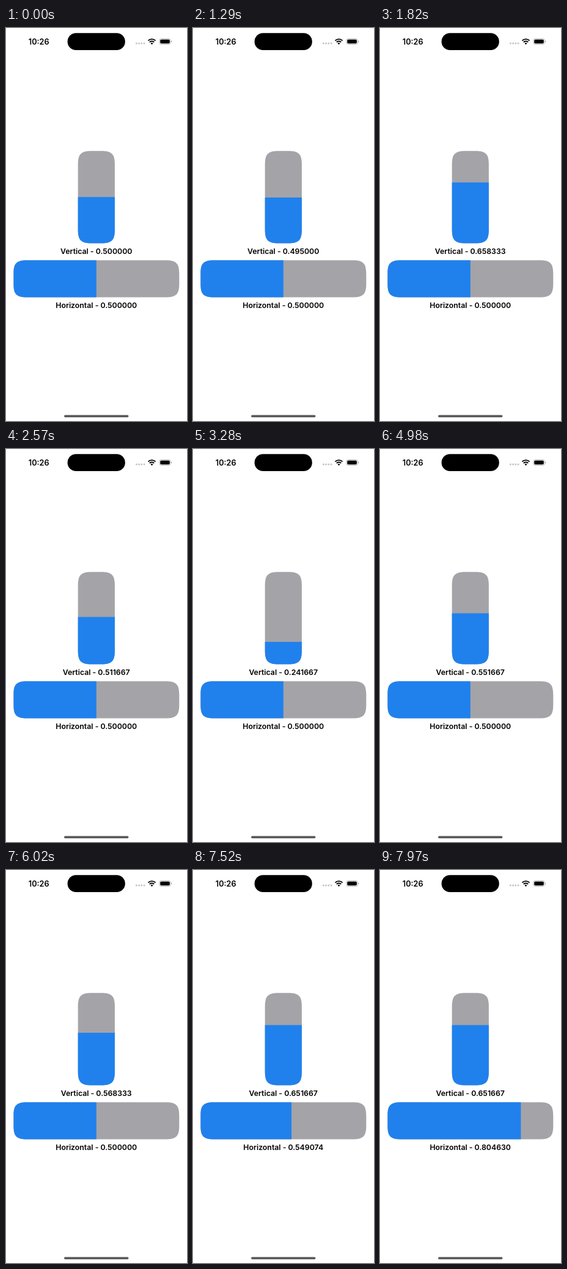
An HTML page for the animation above (8 s loop, 296 by 640 pixels).

```html
<!DOCTYPE html>
<html lang="en">
<head>
<meta charset="utf-8">
<title>Sliders</title>
<style>
  html, body { margin: 0; width: 100%; height: 100%; overflow: hidden; background: #fff; }
  svg { display: block; width: 296px; height: 640px; }
  text { font: 600 12.3px Inter, sans-serif; }
  .label { text-anchor: middle; }
  .clock { font-size: 12.7px; }
  .track { fill: #a4a3a8; }
  .fill { fill: #2081ed; }
</style>
</head>
<body>
<svg viewBox="0 0 296 640">
  <defs>
    <clipPath id="tall"><path d="M117.700 222.200c0-17 5-22 22-22h16.200c17 0 22 5 22 22v106.200c0 17-5 22-22 22h-16.200c-17 0-22-5-22-22z"/></clipPath>
    <clipPath id="wide"><path d="M12.300 400.200c0-17 5-22 22-22h227c17 0 22 5 22 22v16.200c0 17-5 22-22 22h-227c-17 0-22-5-22-22z"/></clipPath>
  </defs>

  <text class="clock" x="36.800" y="26.500">10:26</text>
  <rect x="100.600" y="8.300" width="94.200" height="27.800" rx="13.900"/>
  <g fill="#c4c4c6">
    <circle cx="213.400" cy="25" r="1.500"/><circle cx="217.600" cy="25" r="1.500"/>
    <circle cx="221.800" cy="25" r="1.500"/><circle cx="226" cy="25" r="1.500"/>
  </g>
  <g fill="none" stroke="#000" stroke-width="1.900">
    <path d="M232.500 20.600a8.500 8.500 0 0 1 12 0"/>
    <path d="M234.800 23a5.200 5.200 0 0 1 7.400 0"/>
  </g>
  <path d="M238.500 27l-2-2.100a2.900 2.900 0 0 1 4 0z"/>
  <rect x="250.900" y="17.400" width="18.200" height="9.200" rx="3" fill="none" stroke="#a6a6a6" stroke-width=".8"/>
  <rect x="252.200" y="18.700" width="15.600" height="6.600" rx="1.800"/>
  <path d="M270 20.500q1.300.4 1.300 1.500t-1.300 1.500z" fill="#a6a6a6"/>

  <g clip-path="url(#tall)">
    <rect class="track" x="117" y="200" width="62" height="151"/>
    <rect class="fill" id="vFill" x="117" width="62" height="151"/>
  </g>
  <text class="label" id="vText" x="147.700" y="367.500"></text>

  <g clip-path="url(#wide)">
    <rect class="track" x="12" y="378" width="272" height="61"/>
    <rect class="fill" id="hFill" x="12.300" y="378" height="61"/>
  </g>
  <text class="label" id="hText" x="147.700" y="455.500"></text>

  <rect x="95" y="630.200" width="105.500" height="3.800" rx="1.900" fill="#5c5c5e"/>
</svg>
<script>
  const LOOP = 8000;
  const linear = p => p;
  const sineOut = p => Math.sin(p * Math.PI / 2);

  // A drag moves in evenly timed ticks; positions are in device pixels.
  const drag = (start, end, ticks, from, to, ease = linear) => ({ start, end, ticks, from, to, ease });
  const jump = (start, to) => drag(start, start, 1, to, to);

  const vertical = {
    length: 600,
    moves: [
      jump(0, 300), jump(1290, 297),
      drag(1490, 2140, 7, 314, 476),
      drag(2370, 2970, 7, 482, 132, sineOut),
      drag(3070, 3170, 2, 130, 136),
      drag(3280, 3810, 6, 145, 361),
      jump(4980, 331),
      drag(5890, 6020, 2, 335, 341),
      jump(7210, 391)
    ]
  };
  const horizontal = {
    length: 1080,
    moves: [jump(0, 540), jump(7210, 545), drag(7520, 7970, 5, 593, 869)]
  };

  function valueAt({ length, moves }, t) {
    const { start, end, ticks, from, to, ease } = moves.findLast(m => m.start <= t);
    const last = ticks - 1;
    const progress = t >= end ? 1 : Math.floor((t - start) / (end - start) * last) / last;
    return Math.round(from + (to - from) * ease(progress)) / length;
  }

  const $ = id => document.getElementById(id);

  function draw(now) {
    const t = now % LOOP;
    const v = valueAt(vertical, t);
    const h = valueAt(horizontal, t);
    $('vFill').setAttribute('y', 350.4 - 150.2 * v);
    $('hFill').setAttribute('width', 271 * h);
    $('vText').textContent = 'Vertical - ' + v.toFixed(6);
    $('hText').textContent = 'Horizontal - ' + h.toFixed(6);
    requestAnimationFrame(draw);
  }
  draw(performance.now());
</script>
</body>
</html>
```
